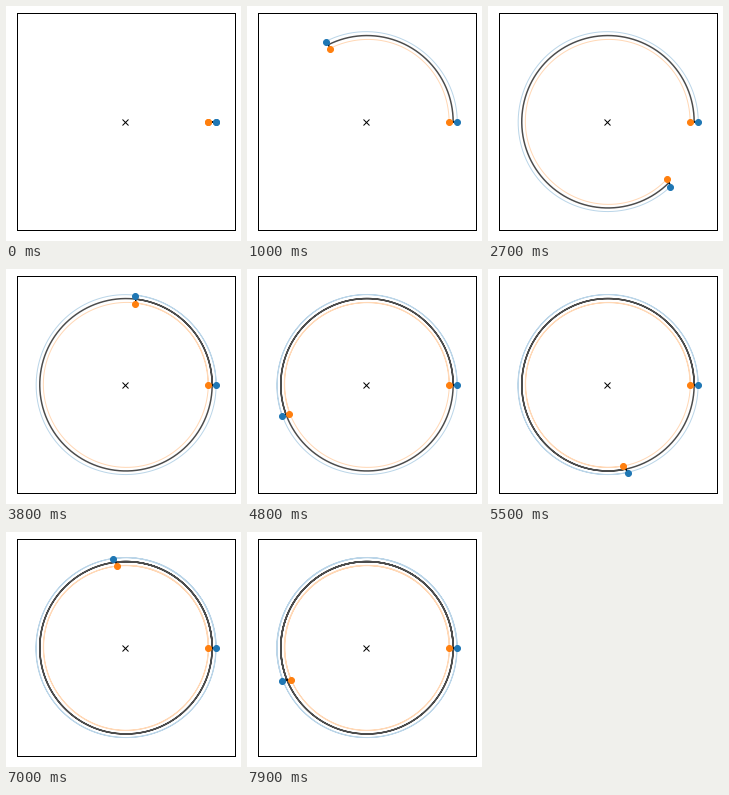
A matplotlib script that plays this animation: 235 by 235 pixels, repeating every 8000 ms.

```python
import numpy as np
import matplotlib.pyplot as plt
from matplotlib.animation import FuncAnimation

SIZE, DPI = 235, 72
FRAMES, INTERVAL = 80, 100
BOX = 217.44             # axes side in pixels
LEFT, BOTTOM = 11.24, 10.52
RADIUS, HALF = 86.2, 4.08  # orbit radius, half the rod length
ORBIT = np.radians(116.7)  # rad per second
SWING, SWING_PERIOD = np.radians(30), 1.93
STEPS = 20               # trail points per frame
SNAP = -0.5 - 0.5j       # makes markers round down to whole pixels


def positions(t):
    """Outer end, inner end and midpoint of the rod as complex numbers."""
    angle = ORBIT * t
    tilt = angle - SWING * np.sin(2 * np.pi * t / SWING_PERIOD)
    mid = RADIUS * np.exp(1j * angle)
    arm = HALF * np.exp(1j * tilt)
    return mid + arm, mid - arm, mid


plt.rcParams["axes.linewidth"] = 1
fig = plt.figure(figsize=(SIZE / DPI, SIZE / DPI), dpi=DPI, facecolor="white")
ax = fig.add_axes([LEFT / SIZE, BOTTOM / SIZE, BOX / SIZE, BOX / SIZE])
ax.set(xlim=(-BOX / 2, BOX / 2), ylim=(-BOX / 2, BOX / 2), xticks=[], yticks=[])

ax.plot(SNAP.real, SNAP.imag, "kx")
trails = [
    ax.plot([], [], color=color, lw=width, alpha=alpha, zorder=2)[0]
    for color, width, alpha in (("C0", 1, 0.3), ("C1", 1, 0.3), ("k", 1.5, 0.7))
]


def add_rod():
    rod, = ax.plot([], [], "k-", lw=1.5, zorder=3)
    ends = [ax.plot([], [], "o", color=c, zorder=4)[0] for c in ("C0", "C1")]
    return rod, ends


def place(body, t):
    rod, ends = body
    points = np.array(positions(t)[:2])
    rod.set_data(points.real, points.imag)
    for end, p in zip(ends, points + SNAP):
        end.set_data([p.real], [p.imag])


start, current = add_rod(), add_rod()
place(start, 0)


def update(frame):
    t = np.linspace(0, frame, frame * STEPS + 1) * INTERVAL / 1000
    for trail, path in zip(trails, positions(t)):
        trail.set_data(path.real, path.imag)
    place(current, t[-1])
    return [*trails, current[0], *current[1]]


anim = FuncAnimation(fig, update, frames=FRAMES, interval=INTERVAL,
                     repeat=True, repeat_delay=0)
plt.show()
```
